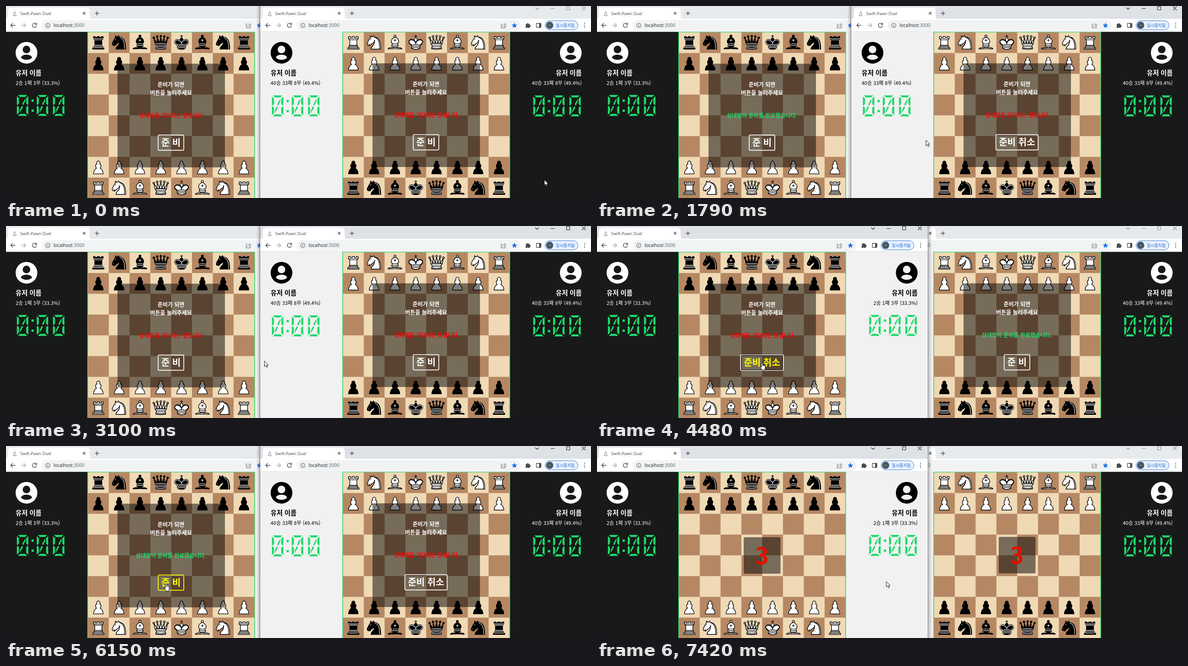
Write an HTML page that moves like this. It is 1280 px wide and 421 px high and loops after 8 s.

```html
<!DOCTYPE html>
<html lang="ko">
<head>
<meta charset="utf-8">
<title>Swift-Pawn Duel</title>
<style>
  html, body { margin: 0; width: 100%; height: 100%; overflow: hidden; background: #fff; }
  svg { display: block; width: 1280px; height: 421px; }
  text { font-family: "Noto Sans CJK KR", "Noto Sans CJK JP", "Noto Sans CJK", sans-serif; }
  .ui { font-family: "Open Sans", "Noto Sans", sans-serif; }
  .mid { text-anchor: middle; }
  .end { text-anchor: end; }
  .bold { font-weight: 700; }
  .line { fill: none; stroke-width: 1.3; }
</style>
</head>
<body>
<svg id="stage" viewBox="0 0 1280 421" xmlns="http://www.w3.org/2000/svg"></svg>
<script>
const LOOP = 8000, OFFSET = 558;
const CELL = 45.53, BOARD_X = 179.3, BOARD_Y = 57.6;
const GREEN = '#1edb69', DARK = '#181a19', PALE = '#f1f1f1';
const WAITING = '상대방을 기다리는 중입니다';
const READY = '상대방이 준비를 완료했습니다.';
const stage = document.getElementById('stage');

// Each piece: outline on a 45-unit square, then inner detail lines.
const PIECES = {
  p: ['M22.5 9c-2.2 0-4 1.8-4 4 0 .9.3 1.7.8 2.4C17.3 16.5 16 18.6 16 21c0 2 .9 3.8 2.4 5C15.4 27.1 11 31.6 11 39.5h23c0-7.9-4.4-12.4-7.4-13.5C28.1 24.8 29 23 29 21c0-2.4-1.3-4.5-3.3-5.6.5-.7.8-1.5.8-2.4 0-2.2-1.8-4-4-4z', ''],
  r: ['M9 39h27v-3H9zM12 36v-4h21v4zM14 29.5V17l-3-3V9h4v2h5V9h5v2h5V9h4v5l-3 3v12.5l1.5 2.5h-20z',
      'M12 35.7h21M12.5 32h20M14 29.5h17M14 17h17M11 14h23'],
  n: ['M22 10c10.5 1 16.5 8 16 29H15c0-9 10-6.5 8-21M24 18c.4 2.9-5.5 7.4-8 9-3 2-2.8 4.3-5 4-1-.9 1.4-3 0-3-1 0 .2 1.2-1 2-1 0-4 1-4-4 0-2 6-12 6-12s1.9-1.9 2-3.5c-.7-1-.5-2-.5-3 1-1 3 2.5 3 2.5h2s.8-2 2.5-3c1 0 1 3 1 3',
      'M24.5 11.6c3.2 1 5.7 2.9 8 7.1S35.6 29 35.2 38.5M9 25.5v.4M14.6 15.2l-.6 1.2'],
  b: ['M9 36c3.4-1 10.1.4 13.5-2 3.4 2.4 10.1 1 13.5 2 0 0 1.7.5 3 2-.7 1-1.7 1-3 .5-3.4-1-10.1.5-13.5-1-3.4 1.5-10.1 0-13.5 1-1.4.5-2.3.5-3-.5 1.4-1.5 3-2 3-2zM15 32c2.5 2.5 12.5 2.5 15 0 .5-1.5 0-2 0-2 0-2.5-2.5-4-2.5-4 5.5-1.5 6-11.5-5-15.5-11 4-10.5 14-5 15.5 0 0-2.5 1.5-2.5 4 0 0-.5.5 0 2zM25 8a2.5 2.5 0 1 1-5 0 2.5 2.5 0 1 1 5 0z',
      'M17.5 26h10M15 30h15M22.5 15.5v5M20 18h5'],
  q: ['M9 26c8.5-1.5 21-1.5 27 0l2.5-12.5L31 25l-.3-14.1-5.2 13.6-3-14.5-3 14.5-5.2-13.6L14 25 6.5 13.5zM9 26c0 2 1.5 2 2.5 4 1 1.5 1 1 .5 3.5-1.5 1-1 2.5-1 2.5-1.5 1.5 0 2.5 0 2.5 6.5 1 16.5 1 23 0 0 0 1.5-1 0-2.5 0 0 .5-1.5-1-2.5-.5-2.5-.5-2 .5-3.5 1-2 2.5-2 2.5-4-8.5-1.5-18.5-1.5-27 0z'
      + [[6, 12], [14, 9], [22.5, 8], [31, 9], [39, 12]].map(([x, y]) => `M${x - 2} ${y}a2 2 0 1 1 4 0 2 2 0 1 1-4 0z`).join(''),
      'M10 26.3c8-1.3 17-1.3 25 0M11.5 30c3.5-1 18.5-1 22 0M12 33.5c6-1 15-1 21 0M11.5 36.5c6 .8 16 .8 22 0'],
  k: ['M22.5 25s4.5-7.5 3-10.5c0 0-1-2.5-3-2.5s-3 2.5-3 2.5c-1.5 3 3 10.5 3 10.5M12.5 37c5.5 3.5 14.5 3.5 20 0v-7s9-4.5 6-10.5c-4-6.5-13.5-3.5-16 4V27v-3.5c-2.5-7.5-12-10.5-16-4-3 6 6 10.5 6 10.5zM22.5 11.6V6M20 8h5',
      'M12.5 30c5.5-3 14.5-3 20 0m-20 3.5c5.5-3 14.5-3 20 0m-20 3.5c5.5-3 14.5-3 20 0M32 29s8-4 6-9.2C34 14.5 25 18 22.5 24.5v2-2C20 18 10.5 14.5 7 19.8 5 25 13 29 13 29']
};

const rect = (x, y, w, h, fill, extra = '') =>
  `<rect x="${x}" y="${y}" width="${w}" height="${h}" fill="${fill}" ${extra}/>`;
const text = (x, y, size, fill, str, cls = '', id = '') =>
  `<text x="${x}" y="${y}" font-size="${size}" fill="${fill}" class="${cls}" ${id && `id="${id}"`}>${str}</text>`;
const line = (d, color = '#45484c', extra = '') =>
  `<path class="line" d="${d}" stroke="${color}" ${extra}/>`;
const circle = (x, y, r, fill, extra = '') =>
  `<circle cx="${x}" cy="${y}" r="${r}" fill="${fill}" ${extra}/>`;

function piece(kind, white, col, row) {
  const [outline, detail] = PIECES[kind];
  const x = BOARD_X + col * CELL + 2, y = BOARD_Y + row * CELL + 1;
  return `<g transform="translate(${x} ${y}) scale(.92)" stroke-width="1.5" stroke-linejoin="round" stroke-linecap="round">
    <path d="${outline}" fill="${white ? '#fff' : '#000'}" stroke="#000"/>
    <path d="${detail}" fill="none" stroke="${white ? '#000' : '#eee'}" stroke-width="1.3"/></g>`;
}

function board(order, whiteOnTop) {
  let out = rect(BOARD_X - .6, BOARD_Y - .6, CELL * 8 + 1.2, CELL * 8 + 9, '#f0d9b5', `stroke="${GREEN}" stroke-width="1.5"`);
  for (let row = 0; row < 8; row++)
    for (let col = 0; col < 8; col++)
      if ((row + col) % 2) out += rect(BOARD_X + col * CELL, BOARD_Y + row * CELL, CELL, CELL, '#b58863');
  for (let col = 0; col < 8; col++)
    out += piece(order[col], whiteOnTop, col, 0) + piece('p', whiteOnTop, col, 1)
         + piece('p', !whiteOnTop, col, 6) + piece(order[col], !whiteOnTop, col, 7);
  return out;
}

function clock(x, y) {
  const half = `<path d="M2.5 0H22.5L18.5 4.6H6.5ZM0 2.5L4.6 7V18.5L1.8 22.3 0 21ZM25 2.5V21L23.2 22.3 20.4 18.5V7ZM18.6 7.5V12.5L14.6 21.5H12.2V18.5Z"/>`;
  const zero = dx => `<g transform="translate(${dx} 0)">${half}<g transform="rotate(180 12.5 23)">${half}</g></g>`;
  return `<g fill="${GREEN}" transform="translate(${x} ${y})">${zero(0)}${zero(43.5)}${zero(79)}
    ${rect(32, 10, 5, 5, GREEN)}${rect(32, 32, 5, 5, GREEN)}</g>`;
}

function player(right, dark, stats, rate, dy) {
  const ink = dark ? '#fff' : '#000', paper = dark ? DARK : PALE;
  const cx = right ? 677.7 : 44.8, tx = right ? 701.7 : 21, cls = right ? 'end' : '';
  return rect(right ? 544.4 : -3, 56.5, right ? 190 : 181, 370, paper)
    + circle(cx, 102.6, 23.8, ink) + circle(cx, 95.4, 8.3, paper)
    + `<path transform="translate(${cx} 102.6)" d="M-12 11C-12 2 12 2 12 11 10 14-5 17-12 11Z" fill="${paper}"/>`
    + `<path transform="translate(${cx} 102.6)" d="M-12 11C-6 17 6 17 12 11Z" fill="${paper}"/>`
    + text(tx, 152, 14.3, ink, '유저 이름', cls + ' bold')
    + text(tx, 172.5, 11, ink, `${stats} <tspan font-weight="500">(${rate}%)</tspan>`, cls)
    + clock(right ? 595.6 : 23.8, 195 + dy);
}

function chrome(id) {
  const grey = '#5f6368', blue = '#1967d2';
  return rect(-2, 0, 728, 29, '#e7eaed', `id="${id}strip"`)
    + `<path d="M-2 28.5Q4 28.5 4 22V11Q4 3.5 11 3.5H176Q183 3.5 183 11V22Q183 28.5 190 28.5Z" fill="#fff"/>`
    + rect(-2, 28, 728, 28, '#fff') + rect(-2, 55.6, 728, .9, '#dcdee1')
    + `<path transform="translate(12.7 10) scale(.28)" d="${PIECES.p[0]}" fill="#fff" stroke="#555" stroke-width="3"/>`
    + text(31, 19.5, 9, '#45484c', 'Swift-Pawn Duel', 'ui')
    + line('M168.3 13.3l5.4 5.4m0-5.4l-5.4 5.4M194.5 16h9m-4.5-4.5v9')
    + line('M20.5 42.5H10.5M15 37.8L10.3 42.5 15 47.2')
    + line('M33 42.5H43M38.5 37.8L43.2 42.5 38.5 47.2', '#a9abae')
    + line('M66 39.5A4.7 4.7 0 1 0 66.8 43.5M67 36.8V40.6H63.2')
    + rect(78, 31, 490, 23.4, '#f1f3f4', 'rx="11.7"')
    + circle(91.5, 42.5, 4.7, 'none', `stroke="${grey}" stroke-width="1.1"`)
    + line('M91.5 41.8V45M91.5 39.7V40.8', grey)
    + text(104, 46, 10, '#202124', 'localhost<tspan fill="#5f6368">:3000</tspan>', 'ui')
    + line('M528 39.5H525.5V48H534.5V45M528 45.5C528.5 42 531 41 533 41V38.5L536.5 42 533 45.3V43', grey, 'style="stroke-width:1"')
    + `<path d="M554.5 36.5L556.2 40.5 560.4 40.9 557.2 43.7 558.2 48 554.5 45.7 550.8 48 551.8 43.7 548.6 40.9 552.8 40.5Z" fill="#1a73e8"/>`
    + `<path d="M579 39.5H582A1.7 1.7 0 1 1 585.3 39.5H588V42.2A1.7 1.7 0 1 1 588 45.5V48H584.8A1.7 1.7 0 0 0 581.8 48H579V45A1.7 1.7 0 0 0 579 42Z" fill="#45484c"/>`
    + rect(602.5, 38, 10, 9, 'none', 'stroke="#45484c" stroke-width="1.3" rx="1"') + rect(608.5, 38, 4, 9, '#45484c')
    + rect(621.5, 32.3, 72, 20, '#eaf1fd', `rx="10" stroke="${blue}" stroke-width=".9"`)
    + circle(631.5, 42.3, 8, '#455a64') + rect(629.8, 41.8, 3.4, 1, '#cfd8dc')
    + text(645, 45.6, 9, blue, '일시중지됨')
    + [38, 42.3, 46.6].map(y => circle(708, y, 1.1, '#45484c')).join('')
    + `<path id="${id}controls" class="line" style="stroke-width:1.1" d="M600 3.5L604 7.5 608 3.5M634 5.5H642.5M668.5 1.5H675.5V8.5H668.5ZM702.5 1.2L710.3 9M710.3 1.2L702.5 9"/>`;
}

function overlay(id, dy) {
  return `<g transform="translate(0 ${dy})">
    <g id="${id}lobby">${rect(244, 126.5, 235, 227.3, 'rgba(0,0,0,.5)')}
      ${text(361, 176.6, 12, '#fff', '준비가 되면', 'mid bold')}
      ${text(361, 194.6, 12, '#fff', '버튼을 눌러주세요', 'mid bold')}
      ${text(361, 245, 12, '#f00', WAITING, 'mid bold', id + 'status')}
      <rect id="${id}box" y="282.8" height="33.6" rx="2.5" fill="none" stroke-width="1.7"/>
      <rect id="${id}ring" y="283.8" height="31.6" rx="2" fill="none" stroke="#101010" stroke-width="1.3"/>
      ${text(361, 307.3, 20, '#fff', '', 'mid bold', id + 'label')}
    </g>
    <g id="${id}count">${rect(321, 200, 80.5, 80, 'rgba(0,0,0,.5)', 'rx="3"')}
      ${text(361, 259, 50, '#e21000', '3', 'mid bold')}</g></g>`;
}

function browser(id, x, order, flipped) {
  const stats = flipped ? ['40승 33패 8무', '49.4'] : ['2승 1패 3무', '33.3'];
  const dy = flipped ? 1 : 0;
  const left = flipped ? -1.6 : -2, width = 724.2 - left;
  return `<g id="${id}" transform="translate(${x} 0)">
    ${rect(left - 9, 0, 9, 421, 'url(#shadeL)')}${rect(724.2, 0, 9, 421, 'url(#shadeR)')}
    <g clip-path="url(#${id}clip)">${player(false, !flipped, ...stats, dy)}${player(true, flipped, ...stats, dy)}
      ${board(order, flipped)}${chrome(id)}${overlay(id, flipped ? -.8 : 0)}</g>
    <clipPath id="${id}clip">${rect(left, 0, width, 421, '#000')}</clipPath>
    ${rect(left - .8, -2, width + .8, 430, 'none', 'stroke="#77797c" stroke-width="1"')}</g>`;
}

const shade = (id, a, b) => `<linearGradient id="${id}"><stop stop-opacity="${a}"/><stop offset="1" stop-opacity="${b}"/></linearGradient>`;

stage.innerHTML = `<defs>${shade('shadeL', 0, .22)}${shade('shadeR', .22, 0)}</defs>`
  + browser('A', 0, 'rnbqkbnr', false) + browser('B', OFFSET, 'rnbkqbnr', true)
  + `<g id="cursor" stroke="#000" stroke-width=".9" fill="#fff" stroke-linejoin="round">
    <path id="arrow" d="M0 0V12.2L2.8 9.6 4.8 14 6.8 13.1 4.9 8.9H8.6Z"/>
    <path id="hand" transform="translate(-4 0)" d="M3 1.4a1.2 1.2 0 0 1 2.4 0V6c0-.9 2-.9 2 .3 .2-.8 1.9-.6 1.9.5 .3-.7 1.8-.4 1.8.7V11c0 2-1.2 2.6-1.4 5H4.2C4 13.8.9 11.5.2 9.6-.1 8.5 1.2 8 2 9l1 1.2Z"/></g>`;

const $ = id => document.getElementById(id);
const set = (id, attrs) => { for (const k in attrs) $(id).setAttribute(k, attrs[k]); };
const show = (id, on) => $(id).setAttribute('display', on ? 'inline' : 'none');
const write = (id, str) => { if ($(id).textContent !== str) $(id).textContent = str; };

// Pointer moves: start, end, target x, target y, vertical bow.
const MOVES = [
  [30, 360, 839, 303, -18], [590, 720, 916, 303, 0], [1400, 1510, 922, 303, 0],
  [1660, 2020, 491, 299, -7], [2170, 2500, 920, 304, 0], [2850, 3340, 361, 300, -6],
  [4740, 5160, 924, 304, 0], [5420, 5930, 320, 306, 18], [6090, 6150, 350, 302, 0],
  [6400, 6530, 369, 297, 0], [6990, 7220, 633, 297, 0]
];
const BOTH_READY = 6360, COUNTDOWN = 7420;
const TOGGLES = { A: [3500, 4600, BOTH_READY], B: [1290, 2650, 5310] };
const FOCUS = [[0, ''], [1230, 'B'], [3440, 'A'], [5260, 'B'], [6300, 'A']];

function pointer(t) {
  let x = 1178, y = 381;
  for (const [start, end, tx, ty, bow] of MOVES) {
    if (t < start) break;
    const u = Math.min(1, (t - start) / (end - start));
    const p = 1 - (1 - u) ** 1.4;
    x += (tx - x) * p;
    y += (ty - y) * p + bow * Math.sin(Math.PI * p);
  }
  return [x, y];
}

function render(t) {
  const [x, y] = pointer(t);
  const active = FOCUS.filter(([start]) => t >= start).pop()[1];
  const ready = id => TOGGLES[id].filter(start => t >= start).length % 2 === 1;
  const front = active || 'B', back = front === 'A' ? 'B' : 'A';
  if ($(back).nextElementSibling !== $(front)) stage.insertBefore($(back), $(front));

  let hovering = false;
  for (const id of ['A', 'B']) {
    const other = id === 'A' ? 'B' : 'A';
    const width = ready(id) ? 92.6 : 56, left = 361 - width / 2;
    const localX = x - (id === 'B' ? OFFSET : 0);
    const hover = t < BOTH_READY && Math.abs(localX - 361) < width / 2 + 1 && y > 281 && y < 317;
    const ring = id === 'A' && t >= 3440 && t < 5260;
    const grow = ring ? .6 : 0;
    hovering = hovering || hover;
    set(id + 'strip', { fill: active === id ? '#dee1e6' : '#e7eaed' });
    set(id + 'controls', { stroke: active === id ? '#222' : '#8d9093' });
    set(id + 'status', { fill: ready(other) ? GREEN : '#f00' });
    write(id + 'status', ready(other) ? READY : WAITING);
    set(id + 'box', { x: left - grow, width: width + 2 * grow, stroke: hover && !ring ? '#ff0' : '#fff' });
    set(id + 'ring', { x: left + 1, width: width - 2 });
    set(id + 'label', { fill: hover ? '#ff0' : '#fff' });
    write(id + 'label', ready(id) ? '준비 취소' : '준 비');
    show(id + 'ring', ring);
    show(id + 'lobby', t < COUNTDOWN);
    show(id + 'count', t >= COUNTDOWN);
  }
  set('cursor', { transform: `translate(${x.toFixed(2)} ${y.toFixed(2)})` });
  show('hand', hovering);
  show('arrow', !hovering);
}

const begin = performance.now();
function tick() {
  render((performance.now() - begin) % LOOP);
  requestAnimationFrame(tick);
}
tick();
</script>
</body>
</html>
```
